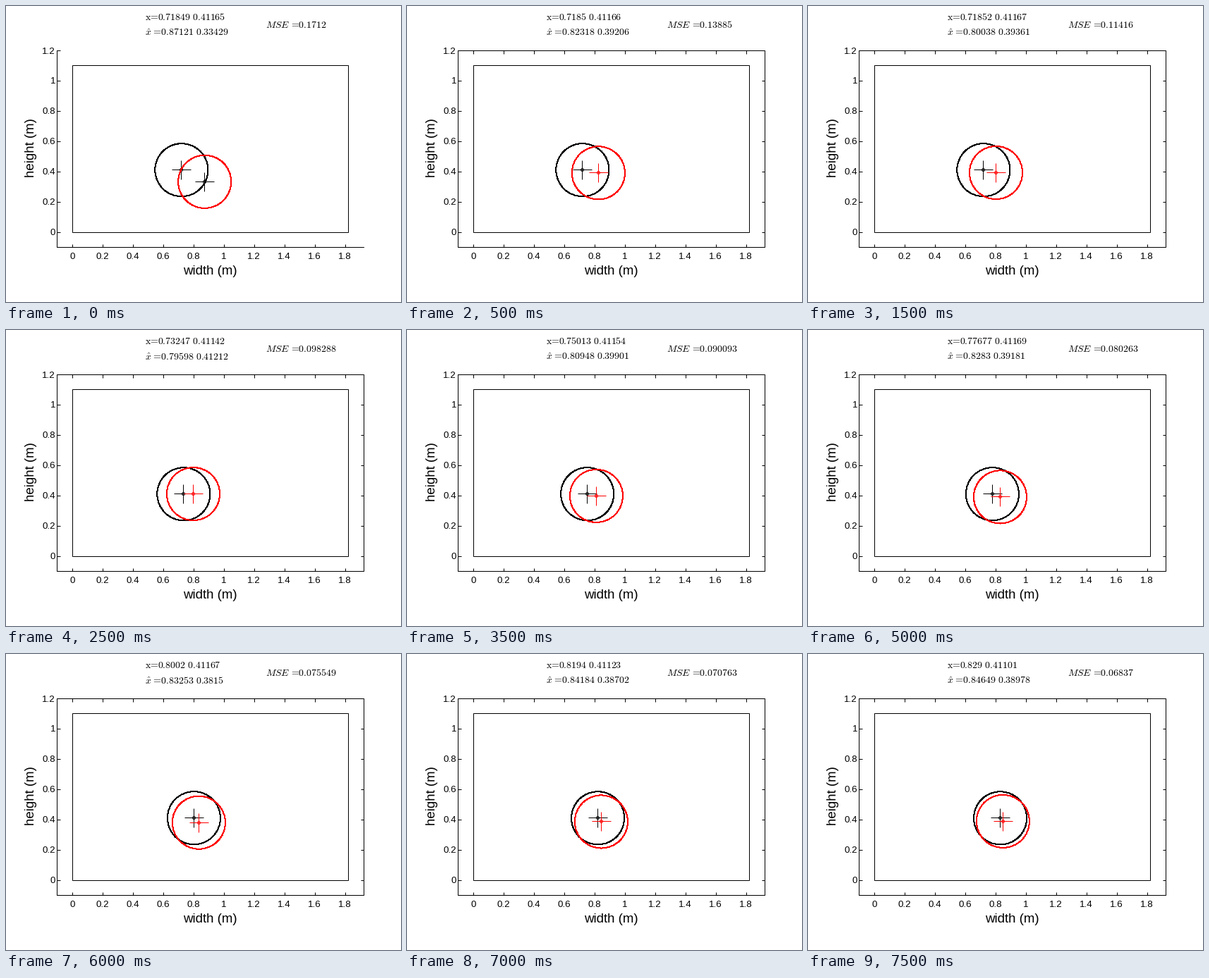
A matplotlib script that plays this animation: 560x420 px, repeating every 8000 ms.

```python
import matplotlib.pyplot as plt
import numpy as np
from matplotlib.animation import FuncAnimation
from matplotlib.patches import Circle, Rectangle
from matplotlib.transforms import Affine2D

W, H, DPI = 560, 420, 80
PX = 72 / DPI  # points per pixel
STEPS = 16
RADIUS = 0.175

plt.rcParams.update({
    "font.family": "Liberation Sans",
    "mathtext.fontset": "cm",
    "toolbar": "None",
})

# key poses: step, true x, true y, estimated x, estimated y, mean error
KEYS = np.array([
    (0, 0.71849, 0.41165, 0.87121, 0.33429, 0.1712),
    (1, 0.71850, 0.41166, 0.82318, 0.39206, 0.13885),
    (3, 0.71852, 0.41167, 0.80038, 0.39361, 0.11416),
    (5, 0.73247, 0.41142, 0.79598, 0.41212, 0.098288),
    (8, 0.75896, 0.4116, 0.81623, 0.39245, 0.085995),
    (10, 0.77677, 0.41169, 0.8283, 0.39181, 0.080263),
    (12, 0.8002, 0.41167, 0.83253, 0.3815, 0.075549),
    (15, 0.829, 0.41101, 0.84649, 0.38978, 0.06837),
]).T


def state(step):
    """Pose and error at a step, linear between the key poses."""
    return [np.interp(step, KEYS[0], track) for track in KEYS[1:]]


fig = plt.figure(figsize=(W / DPI, H / DPI), dpi=DPI, facecolor="white")
ax = fig.add_axes([72 / W, 78 / H, 435 / W, 279 / H])
span = 1.3 * 435 / 279
ax.set_xlim(0.91 - span / 2, 0.91 + span / 2)
ax.set_ylim(-0.1, 1.2)
ax.set_xticks([i / 5 for i in range(10)])
ax.set_yticks([i / 5 for i in range(7)])
ax.tick_params(direction="in", length=4.5 * PX, width=PX,
               labelbottom=False, labelleft=False)
for spine in ax.spines.values():
    spine.set_linewidth(PX)


def label(x, y, s, size, **kw):
    """Text with its baseline at pixel (x, y), y counted from the top."""
    return fig.text(x / W, 1 - y / H, s, fontsize=size * PX,
                    va="baseline", **kw)


for v in ax.get_xticks():
    x = ax.transData.transform((v, 0))[0]
    label(x - 0.5, 359, f"{v:g}", 13.33, ha="center")
for v in ax.get_yticks():
    y = H - ax.transData.transform((0, v))[1]
    label(70, y + 4.5, f"{v:g}", 13.33, ha="right")
label(289, 381, "width (m)", 18.67, ha="center")
label(40, 201.5, "height (m)", 18.67, ha="center", rotation=90,
      rotation_mode="anchor")

ax.add_patch(Rectangle((0, 0), 1.82, 1.1, fill=False, lw=PX))
half_pixel = ax.transData + Affine2D().translate(0.5, -0.5)


class Ball:
    """Ring with a cross and a small dot at its centre."""

    def __init__(self, color, z):
        # without antialiasing a one pixel stroke covers about two pixels
        self.ring = ax.add_patch(Circle((0, 0), RADIUS, fill=False, ec=color,
                                        lw=PX, aa=False, zorder=z,
                                        transform=half_pixel))
        style = dict(mew=PX, mfc="none", color=color, zorder=z + 0.5)
        self.marks = [
            ax.plot([0], [0], "+", ms=27 * PX, aa=False, **style)[0],
            ax.plot([0], [0], "o", ms=4 * PX, **style)[0],
        ]

    def place(self, x, y):
        self.ring.set_center((x, y))
        for m in self.marks:
            m.set_data([x], [y])


truth = Ball("black", 3)
guess = Ball("red", 4)
truth_text = label(196.7, 20, "", 13.85)
guess_text = label(196.7, 42, "", 13.85)
error_text = label(368.3, 31, "", 13.85)


def draw(step):
    x, y, gx, gy, err = state(step)
    truth.place(x, y)
    guess.place(gx, gy)

    # the first picture has an open box and a black cross on the estimate
    started = step > 0
    for m in guess.marks:
        m.set_markeredgecolor("red" if started else "black")
    ax.spines[["top", "right"]].set_visible(started)
    ax.tick_params(top=started, right=started)

    truth_text.set_text(rf"$\text{{x={x:.5g}}}\ \text{{{y:.5g}}}$")
    guess_text.set_text(rf"$\hat{{x}}\ \text{{={gx:.5g}}}\ \text{{{gy:.5g}}}$")
    error_text.set_text(rf"$MSE\ \text{{={err:.5g}}}$")
    return []


anim = FuncAnimation(fig, draw, frames=STEPS, interval=500,
                     init_func=lambda: draw(0), repeat=True, repeat_delay=0)
plt.show()
```
